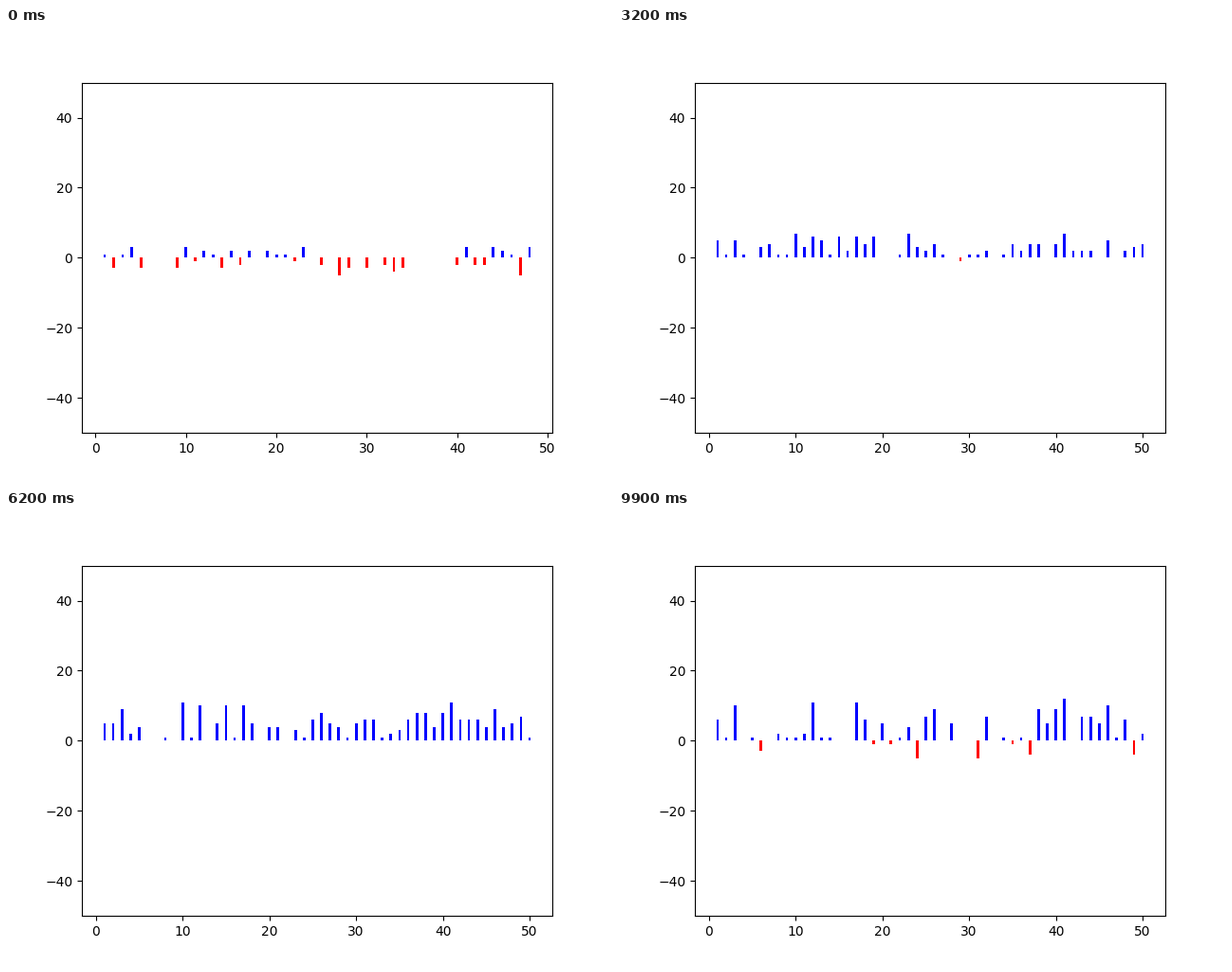
These frames come from a looping animation (640 by 480 pixels, 10000 ms). A matplotlib script:

```python
import numpy as np
import matplotlib.pyplot as plt
from matplotlib.animation import FuncAnimation

FRAMES, STEP_MS, TRADERS = 100, 100, 50

plt.rcParams["text.kerning_factor"] = 6
np.random.seed(0)

# One random trader per step closes and enters again at the current price.
trades = (TRADERS * np.random.rand(FRAMES - 1)).astype(int)
np.random.rand()

# Opening gains run from -5 to 3; the last two traders start flat.
opening = (9 * np.random.rand(TRADERS)).astype(int) - 5
opening[-2:] = 0

# The price moves one unit per step and chases this trend.
trend = np.interp(np.arange(FRAMES),
                  [0, 13, 23, 33, 38, 48, 61, 74, 85],
                  [2.5, 4.5, 0.5, 4.7, 2.5, 7.5, 7.5, 14.5, 8.5])
price = [0]
for goal in trend[1:]:
    price.append(price[-1] + (1 if price[-1] < goal else -1))

ids = np.arange(1, TRADERS + 1)
fig, ax = plt.subplots(figsize=(6.4, 4.8), dpi=100)


def gains(step):
    entry = -opening
    for t, trader in enumerate(trades[:step], 1):
        entry[trader] = price[t]
    return price[step] - entry


def draw(step):
    ax.clear()
    gain = gains(step)
    for side, color in ((gain > 0, "b"), (gain < 0, "r")):
        ax.bar(ids[side], gain[side], width=0.3, color=color)
    ax.set_ylim(-50, 50)
    return ax.patches


anim = FuncAnimation(fig, draw, frames=FRAMES, interval=STEP_MS,
                     init_func=lambda: [], repeat=True, repeat_delay=0)
plt.show()
```
